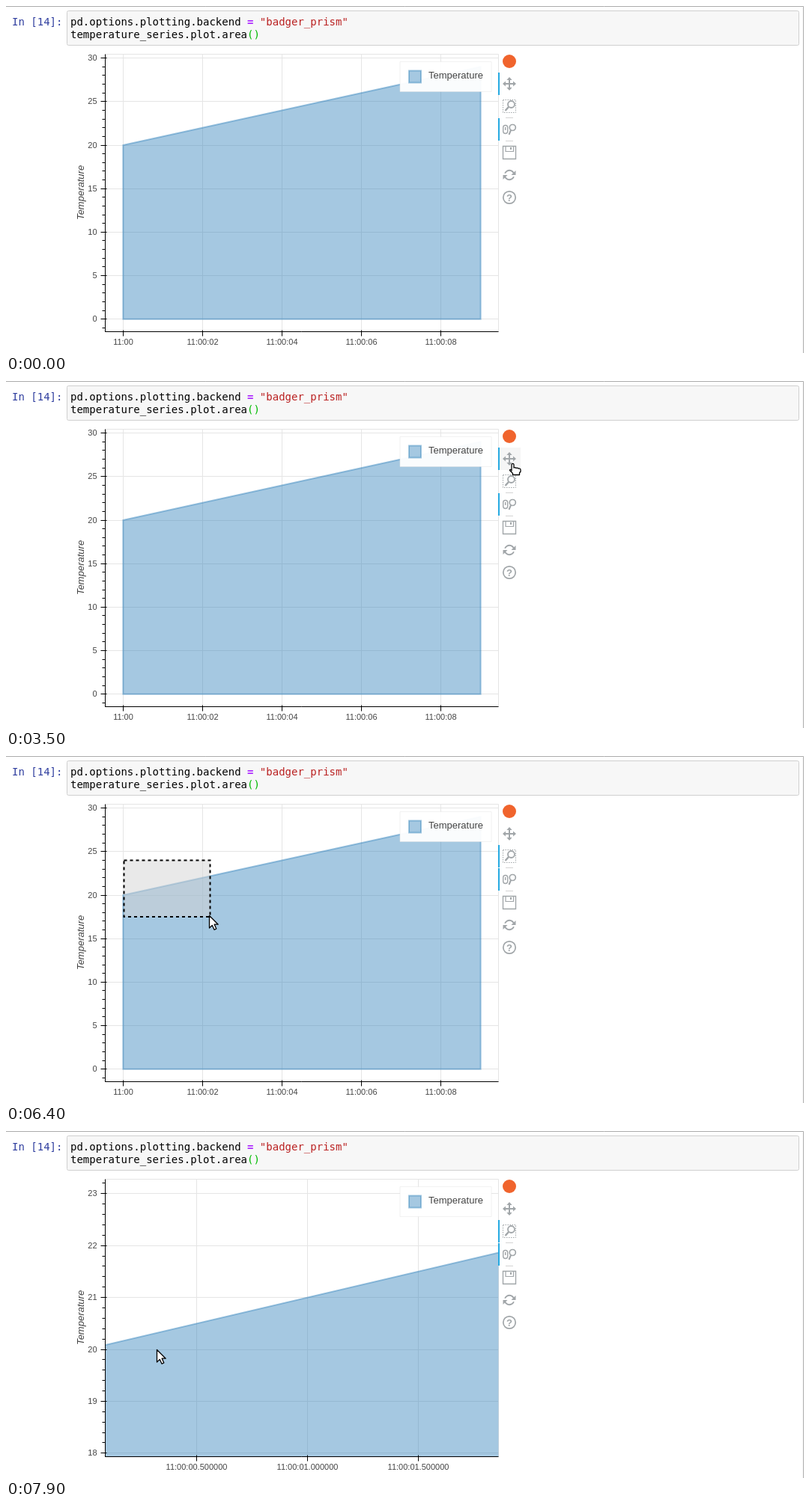
Write an HTML page with a canvas that moves like this. It is 1068 px wide and 464 px high and loops after 8000 ms.

```html
<!DOCTYPE html>
<html lang="en">
<head>
<meta charset="utf-8">
<title>Area plot</title>
<style>
  html, body { margin: 0; width: 100%; height: 100%; overflow: hidden; background: #fff; }
  canvas { display: block; width: 100vw; height: 100vh; }
</style>
</head>
<body>
<canvas id="stage" width="1068" height="464"></canvas>
<script>
const c = document.getElementById('stage').getContext('2d');
const LOOP = 8000, STEP = 100;
const SANS = '"Liberation Sans", Arial, sans-serif';
const MONO = '"DejaVu Sans Mono", monospace';
const plot = { x: 132.5, y: 64.5, w: 525, h: 371 };
const bottom = plot.y + plot.h;
const ICON = '#a1a6a9', BLUE = '#1f77b4', SIZE = 30;
const buttonTop = i => 89 + SIZE * i + (i > 2 ? 2 : i > 1 ? 1 : 0);

// Axis ranges: x0, x1 (seconds), y0, y1 (degrees)
const fullView = [-.45, 9.45, -1.45, 30.45];
const boxView = [.029, 2.198, 17.4775, 24];
const focus = { x: .344, y: 20 };

// Pointer moves: start, end, bend and goal; it rests in between
const entry = [104, -22];
const moves = [
  [300, 1200, [28, 130], [88, 264]],
  [1200, 2100, [66, 450], [270, 470]],
  [2100, 2300, [360, 500], [449, 458]],
  [2300, 3100, [750, 330], [690, 241]],
  [3100, 3500, [686, 170], [677, 110]],
  [3700, 3900, [676, 124], [674, 137]],
  [4300, 5200, [105, 240], [156, 140]],
  [5200, 5500, [146, 136], [157, 138]],
  [5500, 6400, [275, 214], [271, 213]],
  [6800, 7500, [160, 285], [201, 292]]
];

const crisp = v => Math.floor(v) + .5;

function pointerAt(t) {
  let at = entry;
  for (const [begin, end, bend, goal] of moves) {
    if (t <= begin) break;
    const p = Math.min(1, (t - begin) / (end - begin)), q = 1 - p;
    at = at.map((v, i) => q * q * v + 2 * p * q * bend[i] + p * p * goal[i]);
  }
  return at;
}

function viewAt(t) {
  if (t < 6600) return fullView;
  const notches = Math.round(1.2 * Math.max(0, (t - 7400) / STEP)) / 2;
  const scale = 1.0686 ** notches;
  return boxView.map((v, i) => {
    const mid = i < 2 ? focus.x : focus.y;
    return mid + (v - mid) / scale;
  });
}

function line(color, width, ...pts) {
  c.strokeStyle = color;
  c.lineWidth = width;
  c.beginPath();
  for (let i = 0; i < pts.length; i += 2) c.lineTo(pts[i], pts[i + 1]);
  c.stroke();
}

function rect(x, y, w, h, fill, stroke, width = 1, radius = 0) {
  c.beginPath();
  c.roundRect(x, y, w, h, radius);
  if (fill) { c.fillStyle = fill; c.fill(); }
  if (stroke) { c.strokeStyle = stroke; c.lineWidth = width; c.stroke(); }
}

function ring(x, y, r, width, from = 0, to = 2 * Math.PI) {
  c.strokeStyle = ICON;
  c.lineWidth = width;
  c.beginPath();
  c.arc(x, y, r, from, to);
  c.stroke();
}

function shape(color, ...pts) {
  c.fillStyle = color;
  c.beginPath();
  for (let i = 0; i < pts.length; i += 2) c.lineTo(pts[i], pts[i + 1]);
  c.closePath();
  c.fill();
}

function text(str, x, y, font, color = '#444', align = 'left') {
  c.font = font;
  c.fillStyle = color;
  c.textAlign = align;
  c.fillText(str, x, y);
}

function turned(x, y, angle, paint) {
  c.save();
  c.translate(x, y);
  c.rotate(angle);
  paint();
  c.restore();
}

function drawCell() {
  line('#ababab', 1, 0, .5, 1064.5, .5, 1064.5, 464);
  rect(81.5, 6.5, 977, 46, '#f7f7f7', '#cfcfcf', 1, 2);
  const font = '14px ' + MONO;
  text('In [14]:', 8, 26, font, '#303f9f');
  const put = (x, y, parts) => {
    for (const [str, color, weight = ''] of parts) {
      text(str, x, y, weight + font, color);
      x += c.measureText(str).width;
    }
  };
  put(86, 26, [['pd.options.plotting.backend ', '#000'], ['=', '#a2f', 'bold '], [' "badger_prism"', '#ba2121']]);
  put(86, 43, [['temperature_series.plot.area', '#000'], ['()', '#0b0']]);
}

function ticks(lo, hi, step) {
  const out = [];
  for (let i = Math.ceil(lo / step - 1e-6); i * step <= hi + 1e-6; i++) out.push(i * step);
  return out;
}

function clock(s, fine) {
  if (fine) return '11:00:0' + s.toFixed(6);
  return s ? '11:00:0' + s : '11:00';
}

function drawPlot([x0, x1, y0, y1]) {
  const px = v => plot.x + (v - x0) / (x1 - x0) * plot.w;
  const py = v => bottom - (v - y0) / (y1 - y0) * plot.h;
  const fine = x1 - x0 < 5;
  const yStep = fine ? 1 : 5;
  const xs = ticks(x0, x1, fine ? .5 : 2), ys = ticks(y0, y1, yStep);
  const right = plot.x + plot.w;

  rect(plot.x, plot.y, plot.w, plot.h, null, '#e5e5e5');
  for (const v of xs) line('#e5e5e5', 1, crisp(px(v)), plot.y, crisp(px(v)), bottom);
  for (const v of ys) line('#e5e5e5', 1, plot.x, crisp(py(v)), right, crisp(py(v)));

  c.save();
  c.beginPath();
  c.rect(plot.x, plot.y, plot.w, plot.h);
  c.clip();
  c.globalAlpha = .4;
  shape(BLUE, px(0), py(20), px(9), py(29), px(9), py(0), px(0), py(0));
  c.strokeStyle = BLUE;
  c.lineWidth = 2;
  c.stroke();
  c.restore();

  line('#000', 1, plot.x, plot.y, plot.x, bottom + .5);
  line('#000', 1, plot.x - .5, bottom, right, bottom);
  for (const v of ticks(y0, y1, yStep / 5)) line('#000', 1, plot.x - 4, crisp(py(v)), plot.x, crisp(py(v)));
  for (const v of ys) {
    const y = crisp(py(v));
    line('#000', 1, plot.x - 6, y, plot.x + 2, y);
    text(String(Math.round(v)), 121.5, y + 3, '11px ' + SANS, '#444', 'right');
  }
  for (const v of xs) {
    const x = crisp(px(v));
    line('#000', 1, x, bottom - 2, x, bottom + 6);
    text(clock(v, fine), x, 453, '11px ' + SANS, '#444', 'center');
  }
  turned(103.5, 249.5, -Math.PI / 2, () => text('Temperature', 0, 0, 'italic 13px ' + SANS, '#444', 'center'));

  rect(526, 74.5, 122, 40, 'rgba(255,255,255,.95)', 'rgba(229,229,229,.5)');
  c.globalAlpha = .4;
  rect(538, 86.5, 16, 16, BLUE, BLUE, 2);
  c.globalAlpha = 1;
  text('Temperature', 564, 97, '13px ' + SANS);
}

function drawSelection(x, y) {
  rect(157.5, 139.5, x - 157.5, y - 139.5, 'rgba(211,211,211,.5)');
  c.setLineDash([4, 4]);
  rect(157.5, 139.5, x - 157.5, y - 139.5, null, '#000', 2);
  c.setLineDash([]);
}

function drawIcons() {
  rect(663, 65, 18, 18, '#f0642d', null, 0, 9);

  // Pan
  for (let i = 0; i < 4; i++) {
    turned(672, 104, i * Math.PI / 2, () => {
      line(ICON, 2, 0, 0, 0, -6);
      shape(ICON, 0, -9, 3.6, -5, -3.6, -5);
    });
  }
  // Box zoom
  c.setLineDash([1.5, 1.5]);
  rect(663.5, 125.5, 17, 17, null, ICON);
  c.setLineDash([]);
  ring(674.5, 131.5, 4.5, 1.8);
  line(ICON, 2.4, 671, 135, 666.5, 140);
  // Wheel zoom
  rect(663.7, 159.5, 6, 11, null, ICON, 1.4, 3);
  line(ICON, 1.5, 666.7, 162, 666.7, 166);
  ring(676.3, 162.5, 4, 1.7);
  line(ICON, 2, 674, 166, 671.5, 172);
  // Save
  rect(663.5, 187.5, 17, 17, null, ICON, 1.4);
  rect(667, 187.5, 10.5, 7, null, ICON, 1.2);
  rect(673, 189, 2, 3, ICON);
  // Reset
  for (const angle of [0, Math.PI]) {
    turned(672, 226, angle, () => {
      ring(0, 0, 6.3, 1.9, 3.5, 5.9);
      shape(ICON, 8.5, -6, 8.5, 0, 2.5, 0);
    });
  }
  // Help
  ring(672, 256, 8.2, 1.7);
  text('?', 672, 261, 'bold 13px ' + SANS, ICON, 'center');

  for (const y of [149.5, 180.5]) line('#d3d3d3', 1, 667, y, 677, y);
}

function drawToolbar(t, hover) {
  if (hover >= 0) rect(657, buttonTop(hover), SIZE, SIZE, '#f5f5f5');
  for (const i of [t < 4400 ? 0 : 1, 2]) rect(657, buttonTop(i), 2, SIZE, '#26aae1');
  drawIcons();
}

const arrow = new Path2D('M.5 .5V17L4.3 13.4L7 19.3L9.8 18L7.2 12.2H12.2Z');
const hand = new Path2D('M-2 10V2Q-2 .5-.5 .5Q1 .5 1 2V6Q2.5 5 4 6.5Q5.5 5.5 7 7Q10 6.5 10 9V11L8.5 13V15.5H-.5V13.5L-4.5 9.5Q-4.5 7.5-2 9Z');

function drawPointer(x, y, outline) {
  turned(Math.round(x), Math.round(y), 0, () => {
    c.fillStyle = '#fff';
    c.strokeStyle = '#000';
    c.lineWidth = 1.3;
    c.lineJoin = 'round';
    c.fill(outline);
    c.stroke(outline);
  });
}

function draw(t) {
  const [x, y] = pointerAt(t);
  const over = i => x >= 657 && x < 687 && y >= buttonTop(i) && y < buttonTop(i) + SIZE;
  const hover = [0, 1, 2, 3, 4, 5].findIndex(over);
  rect(0, 0, 1068, 464, '#fff');
  drawCell();
  drawPlot(viewAt(t));
  drawToolbar(t, hover);
  if (t > 5500 && t < 6600) drawSelection(x + 1.5, y + 2);
  drawPointer(x, y, hover >= 0 ? hand : arrow);
}

const start = performance.now();
function tick() {
  const t = (performance.now() - start) % LOOP;
  draw(Math.floor(t / STEP) * STEP);
  requestAnimationFrame(tick);
}
tick();
</script>
</body>
</html>
```
